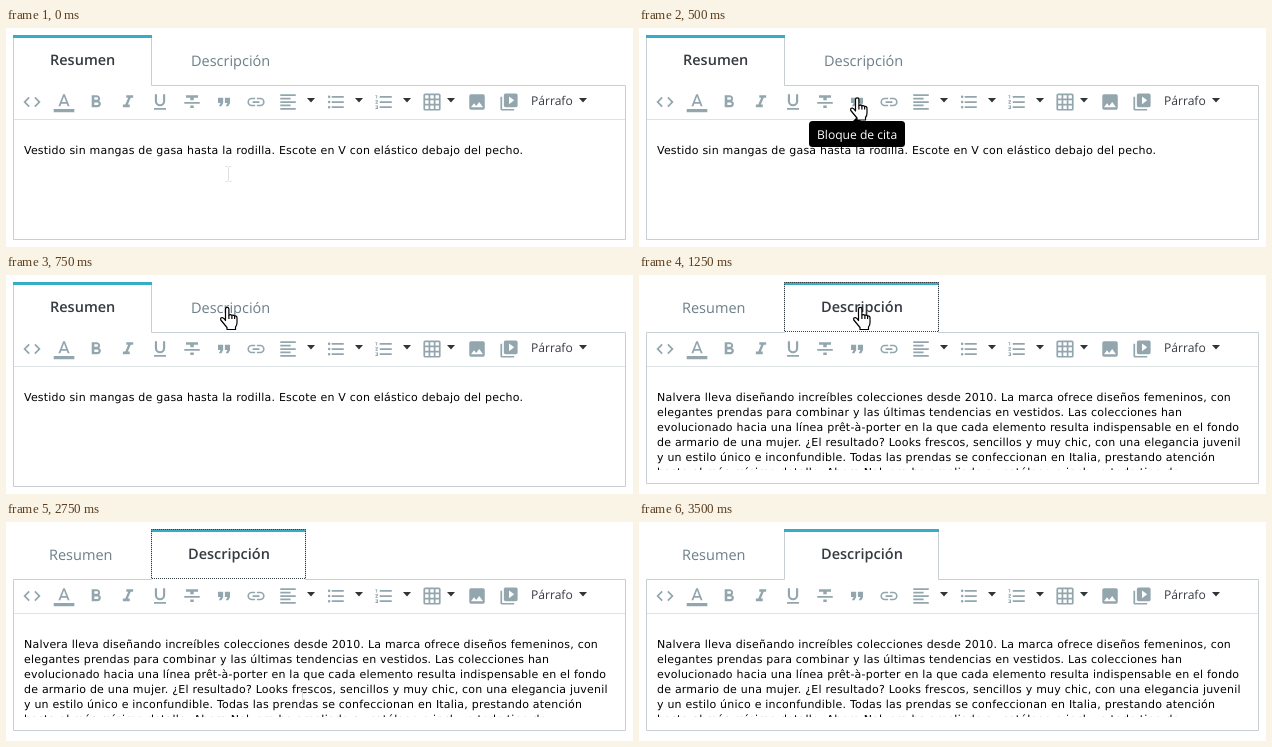
An HTML page that plays this animation: 627 px wide and 219 px high, repeating every 4000 ms.

```html
<!DOCTYPE html>
<html lang="es">
<head>
<meta charset="utf-8">
<style>
  html, body { margin: 0; width: 100%; height: 100%; overflow: hidden; background: #fff; }
  svg { display: block; }
  text { text-rendering: geometricPrecision; white-space: pre; }
  .ui { font: 12.1px "Open Sans", sans-serif; fill: #363a41; }
  .tab { font: 14.5px "Open Sans", sans-serif; fill: #6c7f88; }
  .active { font-weight: 600; fill: #363a41; }
  .body { font: 11px "DejaVu Sans", sans-serif; letter-spacing: .21px; fill: #000; }
  .edge { fill: none; stroke: #c8cfd2; }
  .rule { stroke: #dde2e4; }
  .accent { fill: #33aec6; }
  .focus { fill: none; stroke: #333d42; stroke-dasharray: 1 1; stroke-dashoffset: .5; }
  .beam { fill: none; stroke: #dedede; }
</style>
</head>
<body>
<svg width="627" height="219" viewBox="0 0 627 219">
  <defs>
    <clipPath id="view"><rect x="8" y="92" width="611" height="103"/></clipPath>
  </defs>

  <path class="rule" d="M8 91.5H619"/>

  <g id="summary">
    <path class="edge" d="M7.5 8V211.5H619.5V57.5H145.5V8"/>
    <rect class="accent" x="7" y="7" width="139" height="3"/>
    <text class="tab active" x="44" y="37">Resumen</text>
    <text class="tab" x="185" y="38">Descripción</text>
    <text class="body" x="18" y="126">Vestido sin mangas de gasa hasta la rodilla. Escote en V con elástico debajo del pecho.</text>
  </g>

  <g id="details">
    <path class="edge" d="M145.5 8V57.5H7.5V208.5H619.5V57.5H299.5V8"/>
    <rect class="accent" x="145" y="7" width="155" height="3"/>
    <text class="tab" x="43" y="38">Resumen</text>
    <text class="tab active" x="182" y="37">Descripción</text>
    <g id="lines" clip-path="url(#view)"></g>
  </g>

  <g id="icons" fill="#93a6ae" fill-rule="evenodd"></g>
  <text class="ui" x="525" y="77">Párrafo</text>
  <g id="carets" fill="#30353a"></g>

  <rect id="hoverFocus" class="focus" x="150.5" y="8.5" width="148" height="48"/>
  <rect id="tabFocus" class="focus" x="145.5" y="7.5" width="154" height="49"/>

  <g id="tip">
    <path d="M213 94l5-5 5 5z"/>
    <rect x="170" y="93" width="96" height="26" rx="3.5"/>
    <text class="ui" x="178" y="111" style="fill:#fff">Bloque de cita</text>
  </g>

  <path id="beam" class="beam" d="M-3 -7.5H-1L0 -6.5 1 -7.5H3M0 -6.5V6.5M-3 7.5H-1L0 6.5 1 7.5H3"/>
  <g id="hand" stroke="#000" stroke-width="1.2" stroke-linejoin="round" fill="#fff">
    <path d="M6 14V2.5a1.7 1.7 0 0 1 3.4 0V8.5q1.6-.9 3 .3 1.6-.5 2.7.6 2.3-.3 2.4 2V16q0 3-1.5 4.5V23H7.5V21Q5 18 1.3 13.5 .6 11 2.8 11 4.5 11.5 6 14Z"/>
    <path fill="none" d="M9.4 8.5V12.5M12.4 8.8V12.5M15.1 9.4V12.5"/>
  </g>
</svg>
<script>
const $ = id => document.getElementById(id);

const copy = [
  'Nalvera lleva diseñando increíbles colecciones desde 2010. La marca ofrece diseños femeninos, con',
  'elegantes prendas para combinar y las últimas tendencias en vestidos. Las colecciones han',
  'evolucionado hacia una línea prêt-à-porter en la que cada elemento resulta indispensable en el fondo',
  'de armario de una mujer. ¿El resultado? Looks frescos, sencillos y muy chic, con una elegancia juvenil',
  'y un estilo único e inconfundible. Todas las prendas se confeccionan en Italia, prestando atención',
  'hasta al más mínimo detalle. Ahora Nalvera ha ampliado su catálogo e incluye todo tipo de'
];
$('lines').innerHTML = copy.map((s, i) =>
  `<text class="body" x="18" y="${126 + 15 * i}">${s}</text>`).join('');

// Toolbar glyphs on a 24-unit grid, keyed by centre x
const bar = (x, y, w, h = 2) => `M${x} ${y}h${w}v${h}h${-w}z`;
const listRows = [5, 11, 17].map(y => bar(7, y, 14)).join('');
const dots = [6, 12, 18].map(y => `M2.5 ${y}a1.5 1.5 0 0 1 3 0a1.5 1.5 0 0 1-3 0z`).join('');
const cells = [4, 10, 16].flatMap(x => [4, 10, 16].map(y => bar(x, y, 4, 4))).join('');
const link = 'M11 7H7a5 5 0 0 0 0 10h4v-1.9H7a3.1 3.1 0 0 1 0-6.2h4z';
const icons = [
  [26, 'M9.4 16.6L4.8 12l4.6-4.6L8 6l-6 6 6 6zM14.6 16.6l4.6-4.6-4.6-4.6L16 6l6 6-6 6z'],
  [58, 'M11 3L5.5 17h2.2l1.2-3h6.2l1.2 3h2.2L13 3zM9.6 12L12 5.7 14.4 12z' + bar(0, 20, 24, 4)],
  [90, 'M7 4h6.3a4 4 0 0 1 2.3 6.8A3.8 3.8 0 0 1 14 18H7zM10 6.5v3h3a1.5 1.5 0 0 0 0-3zM10 12.5v3h3.5a1.5 1.5 0 0 0 0-3z'],
  [122, 'M10 4v3h2.2l-3.4 8H6v3h8v-3h-2.2l3.4-8H18V4z'],
  [154, 'M6 3v8a6 6 0 0 0 12 0V3h-2.5v8a3.5 3.5 0 0 1-7 0V3z' + bar(5, 19, 14)],
  [186, 'M5 4v3h5v3h4V7h5V4z' + bar(3, 12, 18) + bar(10, 16, 4, 3)],
  [218, 'M6 17h3l2-4V7H5v6h3zM14 17h3l2-4V7h-6v6h3z'],
  [250, link + bar(8, 11, 8) + 'M13 7h4a5 5 0 0 1 0 10h-4v-1.9h4a3.1 3.1 0 0 0 0-6.2h-4z'],
  [282, [18, 12, 18, 12, 18].map((w, i) => bar(3, 3 + 4 * i, w)).join('')],
  [330, listRows + dots],
  [378, listRows + 'M3 8h1V4H2v1h1zM2 10h3v1l-1.8 2H5v1H2v-1l1.8-2H2zM2 16h3v4H2v-1h2v-.5H3v-1h1V17H2z'],
  [426, 'M4 2h16a2 2 0 0 1 2 2v16a2 2 0 0 1-2 2H4a2 2 0 0 1-2-2V4a2 2 0 0 1 2-2z' + cells],
  [471, 'M5 3h14a2 2 0 0 1 2 2v14a2 2 0 0 1-2 2H5a2 2 0 0 1-2-2V5a2 2 0 0 1 2-2zM8.5 13.5L5 18h14l-4.5-6-3.5 4.5z'],
  [503, 'M4 6H2v14a2 2 0 0 0 2 2h14v-2H4zM8 2h12a2 2 0 0 1 2 2v12a2 2 0 0 1-2 2H8a2 2 0 0 1-2-2V4a2 2 0 0 1 2-2zM12 5.5v9l6-4.5z']
];
$('icons').innerHTML = icons.map(([x, d]) =>
  `<path transform="translate(${x - 10.3} 63.7) scale(.86)" d="${d}"/>`).join('');
$('carets').innerHTML = [305, 353, 401, 445, 577].map(x =>
  `<path d="M${x - 4} 70h8l-4 4.5z"/>`).join('');

const show = (id, on) => $(id).style.display = on ? '' : 'none';
const place = (id, pos) => {
  show(id, pos);
  if (pos) $(id).setAttribute('transform', `translate(${pos})`);
};

function draw() {
  const t = performance.now() % 4000;
  const within = (a, b) => t >= a && t < b;
  show('summary', t < 1250);
  show('details', t >= 1250);
  show('tip', within(500, 750));
  show('hoverFocus', within(1000, 1250));
  show('tabFocus', within(1250, 3500));
  place('beam', t < 250 ? '222.5 146' : t < 500 ? '209.5 108' : within(2750, 3000) && '296.5 176');
  place('hand', within(500, 750) ? '210.5 69' : within(750, 2750) && '213.5 31.5');
  requestAnimationFrame(draw);
}
draw();
</script>
</body>
</html>
```
